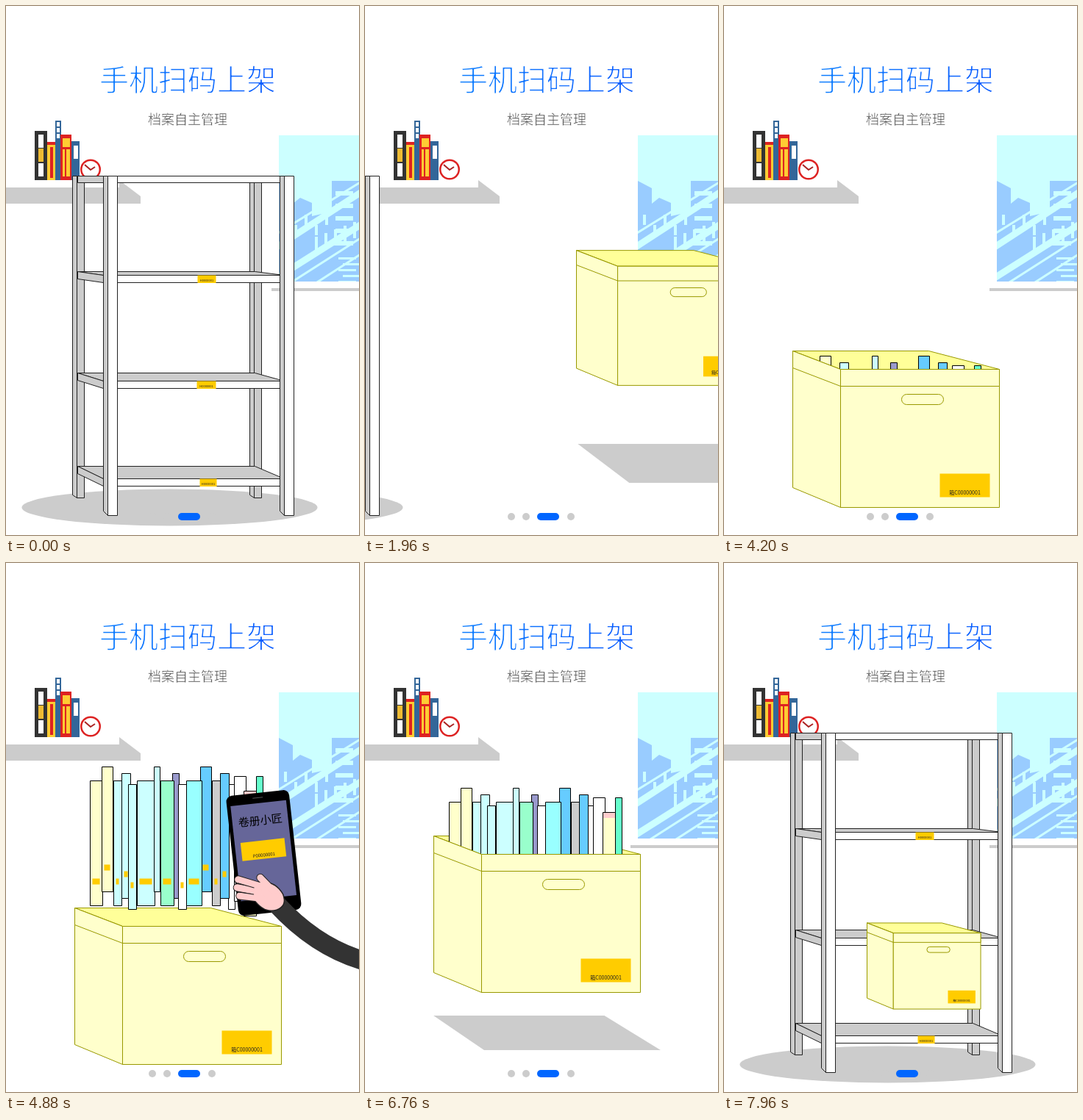
Write an HTML page with a canvas that moves like this. It is 480 by 720 pixels and loops after 8 s.

```html
<!DOCTYPE html>
<html lang="zh">
<head>
<meta charset="utf-8">
<style>
  html, body { margin: 0; width: 480px; height: 720px; overflow: hidden; background: #fff; }
  canvas { display: block; }
</style>
</head>
<body>
<canvas id="stage" width="480" height="720"></canvas>
<script>
const g = document.getElementById('stage').getContext('2d');
const FONT = '"Noto Sans CJK SC", "Noto Sans CJK", sans-serif';
const GREY = '#ccc', INK = '#222', LABEL = '#fc0';

const clamp = v => Math.max(0, Math.min(1, v));
const ramp = (t, a, b) => clamp((t - a) / (b - a));
const lerp = (a, b, k) => a + (b - a) * k;

function rect(x, y, w, h, fill, line) {
  g.fillStyle = fill;
  g.fillRect(x, y, w, h);
  if (line) { g.strokeStyle = line; g.strokeRect(x, y, w, h); }
}

function poly(fill, line, ...p) {
  g.beginPath();
  for (let i = 0; i < p.length; i += 2) g.lineTo(p[i], p[i + 1]);
  g.closePath();
  if (fill) { g.fillStyle = fill; g.fill(); }
  if (line) { g.strokeStyle = line; g.stroke(); }
}

function rounded(x, y, w, h, r, fill, line) {
  g.beginPath();
  g.roundRect(x, y, w, h, r);
  if (fill) { g.fillStyle = fill; g.fill(); }
  if (line) { g.strokeStyle = line; g.stroke(); }
}

function ellipse(x, y, rx, ry, fill) {
  g.beginPath();
  g.ellipse(x, y, rx, ry, 0, 0, 7);
  g.fillStyle = fill;
  g.fill();
}

function path(width, color, d) {
  g.lineWidth = width;
  g.strokeStyle = color;
  g.stroke(new Path2D(d));
  g.lineWidth = 1;
}

function text(s, x, y, size, color) {
  g.font = `${size}px ${FONT}`;
  g.textAlign = 'center';
  g.fillStyle = color;
  g.fillText(s, x, y);
}

// A white outline pares the strokes down to a light weight.
function thinText(s, x, y, size, color, pare) {
  text(s, x, y, size, color);
  g.lineWidth = pare;
  g.strokeStyle = '#fff';
  g.strokeText(s, x, y);
  g.lineWidth = 1;
}

function group(x, y, draw, scale = 1) {
  g.save();
  g.translate(x, y);
  g.scale(scale, scale);
  g.lineWidth = 1 / scale;
  draw();
  g.restore();
}

function heading() {
  const blue = g.createLinearGradient(128, 0, 366, 0);
  blue.addColorStop(0, '#0a7cff');
  blue.addColorStop(1, '#0a5cff');
  thinText('手机扫码上架', 247, 115, 40, blue, 1.3);
  thinText('档案自主管理', 247, 161, 18, '#555', .4);
}

function cityWindow() {
  g.save();
  g.beginPath();
  g.rect(371, 176, 109, 199);
  g.clip();
  rect(371, 176, 109, 199, '#cff');
  poly('#9cf', null, 371, 238, 390, 248, 390, 269, 400, 261, 416, 268, 416, 286,
    443, 280, 443, 238, 480, 238, 480, 375, 371, 375);
  for (let i = 0; i < 5; i++) {
    rect(378 + i * 14, 284 + (i % 2) * 14, 4, 14, '#cff');
    rect(420 + i * 13, 314 - i * 5, 4, 22, '#cff');
    rect(448, 252 + i * 17, 24, 6, '#cff');
    rect(452 + (i % 2) * 6, 342 + i * 8, 24, 3, '#cff');
  }
  path(9, '#cff', 'M365 330L485 252M365 372L485 296');
  path(3, '#cff', 'M365 312L485 238M385 378L485 314M420 378L485 336');
  g.restore();
  rect(361, 384, 119, 4, GREY);
}

function wallShelf() {
  poly(GREY, null, 0, 247, 154, 247, 154, 237, 183, 259, 183, 269, 0, 269);
  rect(39, 170, 17, 67, '#333');
  rect(44, 175, 7, 18, '#fff');
  rect(44, 194, 7, 18, '#eb3');
  rect(44, 214, 7, 18, '#fff');
  rect(56, 185, 12, 52, '#fc3');
  rect(56, 185, 12, 4, '#d22');
  rect(60, 192, 4, 42, '#d22');
  rect(67, 156, 8, 81, '#369');
  for (const y of [158, 166, 174]) rect(69, y, 4, 6, '#fff');
  rect(74, 175, 15, 62, '#d22');
  rect(77, 180, 10, 12, '#fc3');
  rect(77, 195, 3, 37, '#fc3');
  rect(82, 195, 5, 37, '#fc3');
  rect(89, 184, 11, 53, '#369');
  rect(92, 190, 6, 18, '#fff');
  ellipse(115, 222.5, 14, 14, '#d22');
  ellipse(115, 222.5, 11.5, 11.5, '#fff');
  path(2, '#a22', 'M107 216L115 223L121 219');
}

function post(x, side, face) {
  const back = face === GREY, bottom = back ? 669 : 693, w = back ? 10 : 13;
  const cut = back ? 4 : 6;
  poly(side, INK, x, 231, x + 6, 231, x + 6, bottom, x, bottom - cut);
  rect(x + 6, 231, w, bottom - 231, face, INK);
}

function rack() {
  ellipse(222, 682, 201, 25, GREY);
  post(90, GREY, GREY);
  post(331, GREY, GREY);
  rect(97, 231, 35, 9, GREY, INK);
  rect(151, 231, 227, 9, '#fff', INK);
  for (const [back, front, x, w] of [[361, 366, 260, 25], [499, 510, 259, 26], [626, 643, 263, 23]]) {
    poly(GREY, INK, 97, back, 338, back, 378, front, 132, front);
    poly(GREY, INK, 97, back, 132, front, 132, front + 10, 97, back + 10);
    rect(138, front, 240, 10, '#fff', INK);
    rect(x, front, w, 10.5, LABEL);
    text('H0000001', x + w / 2, front + 8.5, 4, INK);
  }
  post(132, GREY, '#fff');
  post(372, GREY, '#fff');
}

const CREAM = '#ffc', OLIVE = '#990';

function boxTop() {
  poly('#ff9', OLIVE, 0, -1, 185, -1, 281, 24, 65, 24);
}

function boxBand() {
  poly(CREAM, OLIVE, 0, -1, 65, 24, 65, 47, 0, 22);
  rect(65, 24, 216, 23, CREAM, OLIVE);
}

function boxFront() {
  poly(CREAM, OLIVE, 0, -1, 65, 24, 65, 212, 0, 185);
  rect(65, 24, 216, 188, CREAM, OLIVE);
  boxBand();
  rounded(148, 58, 57, 14, 7, CREAM, OLIVE);
  rect(200, 166, 68, 32, LABEL);
  text('箱C00000001', 234, 194, 7, INK);
}

// x, top, width, colour
const BOOKS = [
  [114, 296, 17, CREAM], [130, 277, 15, CREAM], [146, 296, 11, '#cff'], [157, 286, 12, '#cff'],
  [166, 301, 11, '#cff'], [178, 296, 24, '#cff'], [201, 277, 8, '#cff'], [226, 286, 9, '#99c'],
  [210, 296, 18, '#9fc'], [234, 301, 11, '#fff'], [264, 277, 15, '#6cf'], [245, 296, 21, '#9ff'],
  [280, 296, 11, GREY], [302, 301, 9, '#fff'], [291, 286, 12, '#6cf'], [310, 290, 16, '#fff'],
  [340, 290, 9, '#6fc'], [323, 310, 17, CREAM]
];

function books() {
  for (const [x, y, w, color] of BOOKS) {
    rect(x, y, w, 170, color, '#000');
    if (x === 323) rect(x + .5, y + .5, w - 1, 7, '#fcc');
    if (w > 9) rect(x + 3, y + 133, w - 7, 8, LABEL);
  }
}

function bubble(x, y, label) {
  group(x, y, () => {
    poly('#cff', INK, 26, 58, 20, 83, 48, 60);
    rounded(0, 0, 175, 60, 13, '#cff', INK);
    poly('#cff', null, 27, 56, 26, 61, 47, 61, 50, 56);
    text(label, 87.5, 38, 20, '#000');
  });
}

const TILT = -9.1;

// Drawn around the phone's centre at (329, 458), tilted by TILT.
function phone(x, y, angle) {
  g.save();
  g.translate(x, y);
  g.rotate((angle - TILT) * Math.PI / 180);
  g.save();
  g.rotate(TILT * Math.PI / 180);
  rounded(-43, -82, 86, 164, 8, '#000');
  rect(-38, -68, 76, 130, '#669');
  rect(-7, -76, 14, 1, '#555');
  text('卷册小匠', 0, -39, 15, '#000');
  rect(-30, -17, 60, 25, LABEL);
  text('P00000001', 0, 5, 6, INK);
  g.restore();
  g.translate(-329, -458);
  path(26, '#333', 'M350 527Q412 588 486 601Q560 616 660 620');
  g.lineCap = 'round';
  const fingers = 'M296 496L328 504M295 507L325 511M299 518L330 520M326 492L345 510';
  path(11, INK, fingers);
  const palm = 'M322 500Q345 494 357 513Q364 528 350 534Q333 540 318 520Z';
  path(3, INK, palm);
  g.fillStyle = '#fcc';
  g.fill(new Path2D(palm));
  path(9, '#fcc', fingers);
  path(1, INK, 'M296 501L318 506M298 513L318 515');
  g.restore();
}

// Each scan: phone lands, phone leaves, bubble leaves; rest pose, drift per 40 ms, bubble.
const SCANS = [
  { land: 240, leave: 1080, close: 1320, x: 310, y: 375, dx: 40, dy: -13, turn: 4.5, bx: 252.5, by: 206.5, label: '货架标签' },
  { land: 2480, leave: 3280, close: 3520, x: 283, y: 475, dx: 46, dy: -17, turn: 2.9, bx: 252.5, by: 234.5, label: ' 箱标签' },
  { land: 4960, leave: 5680, close: 6000, x: 270.5, y: 420.5, dx: 40, dy: -13, turn: 2.85, bx: 248.5, by: 182.5, label: '案卷标签' }
];

function scan(s, t) {
  if (t > s.land && t < s.close + 240) {
    const wait = 1 - ramp(t, s.land, s.land + 320), out = ramp(t, s.close, s.close + 240);
    bubble(s.bx + 232 * (wait + out), s.by + 100 * wait - 65 * out, s.label);
  }
  const n = Math.max(s.land - t, t - s.leave, 0) / 40;
  if (n < 7) phone(s.x + s.dx * n, s.y + s.dy * n, -12 + s.turn * n);
}

function shadow(shift, down) {
  const at = (a, b) => lerp(a, b, down);
  const top = at(596, 649), bottom = at(649, 686);
  poly(GREY, null, at(95, 90) + shift, top, at(333, 313) + shift, top,
    at(411, 387) + shift, bottom, at(165, 157) + shift, bottom);
}

function crate(t, slide) {
  if (t >= 7520) {
    const k = ramp(t, 7520, 7960);
    group(lerp(557, 194, k) + .5, lerp(330, 490, k) + .5, () => { boxTop(); boxFront(); }, .55);
    return;
  }
  const drop = ramp(t, 6485, 6926), down = ramp(t, 3760, 4160) - drop;
  const x = Math.round(lerp(659, 93, slide)) + .5;
  const y = Math.round(lerp(371, 313, slide) + 157 * down) + .5;
  const scale = lerp(.6, 1, slide);
  if (down < 1) shadow(566 * (1 - slide), down);
  group(x, y, boxTop, scale);
  if (t > 4160 && t < 6920) {
    g.save();
    g.beginPath();
    g.rect(0, 0, 480, y + 60);
    g.clip();
    const sink = 217 * (1 - ramp(t, 4160, 4640)) + 46 * drop;
    group(.5, Math.round(sink) + .5, books);
    g.restore();
  }
  group(x, y, boxFront, scale);
  let lid = null;
  if (t > 3760 && t <= 4120) lid = lerp(313, 156, ramp(t, 3760, 4120));
  if (t >= 6800 && t < 6920) lid = lerp(184, 313, ramp(t, 6800, 6920));
  if (lid !== null) group(x, Math.round(lid) + .5, () => { boxTop(); boxBand(); });
}

function pager() {
  for (const x of [199, 219, 280]) ellipse(x, 695, 5, 5, GREY);
  rounded(234, 690, 30, 10, 5, '#06f');
}

function frame(now) {
  const t = Math.floor(now % 8000 / 40) * 40;
  const slide = ramp(t, 1654, 2120) - ramp(t, 7054, 7520);
  rect(0, 0, 480, 720, '#fff');
  g.lineWidth = 1;
  g.lineCap = 'butt';
  g.lineJoin = 'round';
  heading();
  cityWindow();
  wallShelf();
  if (slide < 1) group(Math.round(-566 * slide) + .5, .5, rack);
  crate(t, slide);
  for (const s of SCANS) scan(s, t);
  pager();
}

const start = performance.now();
function tick() {
  frame(performance.now() - start);
  requestAnimationFrame(tick);
}
tick();
</script>
</body>
</html>
```
